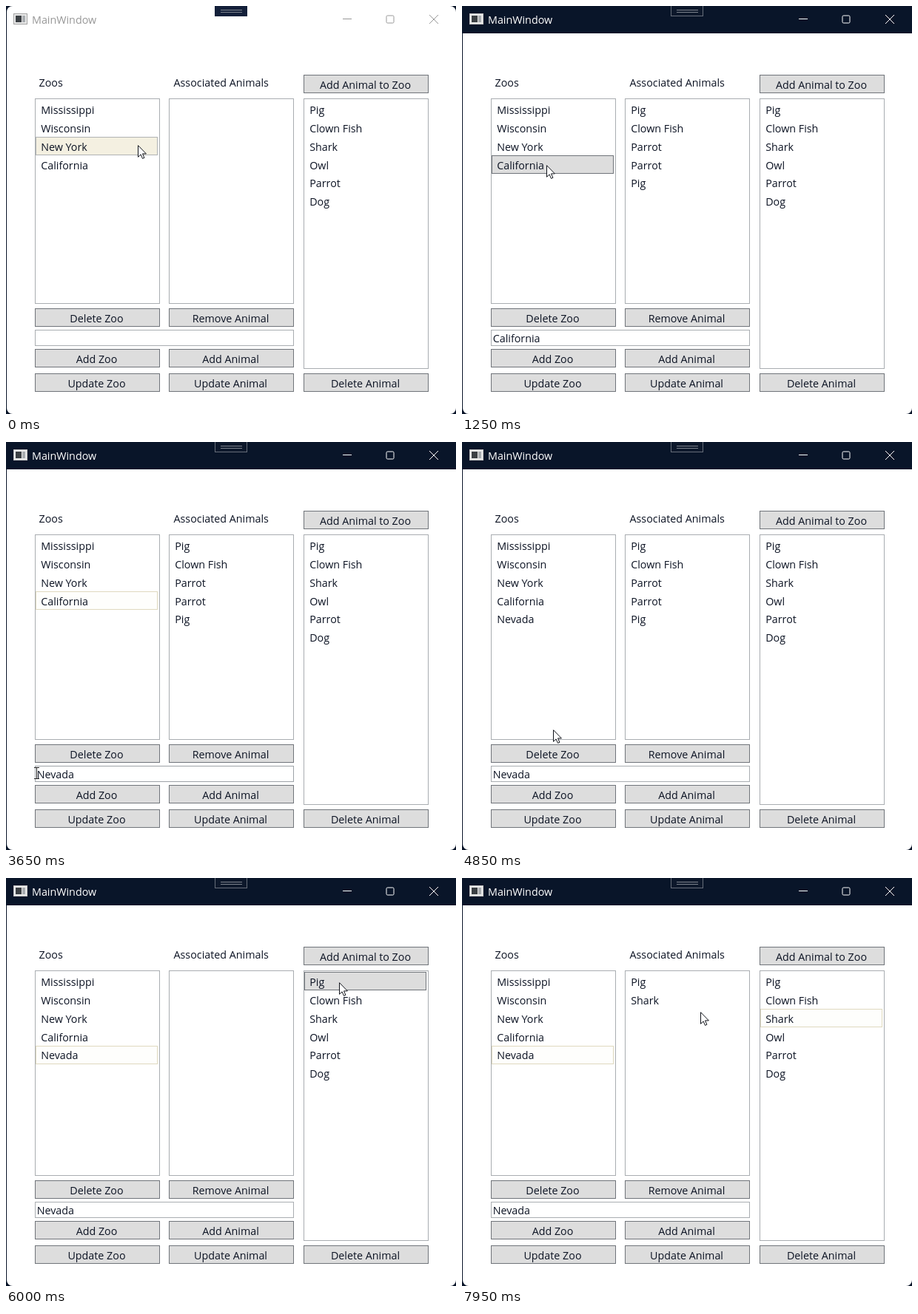
Recreate the animation shown at these times as an HTML page. Size 608 by 552 pixels, loop 8000 ms.

```html
<!DOCTYPE html>
<html lang="en">
<head>
<meta charset="utf-8">
<title>MainWindow</title>
<style>
  html, body { margin: 0; width: 608px; height: 552px; overflow: hidden; background: #fff; }
  svg { display: block; }
  text { font: 14.3px "Open Sans", "Noto Sans", sans-serif; fill: #0d1424; white-space: pre; }
</style>
</head>
<body>
<svg id="stage" width="608" height="552" viewBox="0 0 608 552"></svg>
<script>
const LOOP = 8000, STEP = 50;
const NAVY = '#091529', EDGE = '#70747a', FACE = '#dddddd', FRAME = '#a9adb1';
const stage = document.getElementById('stage');

// Layout: three columns of equal width, list rows and button rows.
const COLUMNS = [39, 220, 402], WIDTH = 169, ROW = 25, LIST_TOP = 125;
const BUTTON_ROWS = { top: 93, remove: 409, add: 464, update: 497 };
const BUTTONS = {
  top: ['', '', 'Add Animal to Zoo'],
  remove: ['Delete Zoo', 'Remove Animal', ''],
  add: ['Add Zoo', 'Add Animal', ''],
  update: ['Update Zoo', 'Update Animal', 'Delete Animal']
};
const STATES = ['Mississippi', 'Wisconsin', 'New York', 'California'];
const ANIMALS = ['Pig', 'Clown Fish', 'Shark', 'Owl', 'Parrot', 'Dog'];
const NEW_ZOO = 'Nevada';
const TYPING = { from: 2750, perLetter: 105 };

// Each event overrides part of the state from its time on.
const EVENTS = [
  [0, { active: false, zoos: STATES, owned: [], zoo: -1, animal: -1, focus: '', text: '' }],
  [350, { active: true, zoo: 0, focus: 'zoos', owned: ['Shark', 'Pig', 'Clown Fish'], text: 'Mississippi' }],
  [1100, { zoo: 3, owned: ['Pig', 'Clown Fish', 'Parrot', 'Parrot', 'Pig'], text: 'California' }],
  [1950, { focus: 'text' }],
  [4450, { focus: '' }],
  [4550, { zoos: [...STATES, NEW_ZOO], zoo: -1 }],
  [5150, { zoo: 4, focus: 'zoos', owned: [] }],
  [5950, { animal: 0, focus: 'animals' }],
  [6450, { focus: '', owned: ['Pig'] }],
  [6850, { animal: 2, focus: 'animals' }],
  [7450, { focus: '', owned: ['Pig', 'Shark'] }]
];

// Places the pointer visits, and its moves: start, end, destination.
const onItem = (column, row, dx = 75) => [COLUMNS[column] + dx, LIST_TOP + 15 + ROW * row];
const onButton = (column, row, dx) => [COLUMNS[column] + dx, BUTTON_ROWS[row] + 15];
const inText = x => [x, 448];
const HOME = [178, 188];
const MOVES = [
  [0, 400, onItem(0, 0)],
  [400, 550, [112, 111]],
  [650, 700, [117, 156]],
  [700, 1100, onItem(0, 3)],
  [1400, 1800, inText(117)],
  [1950, 2150, inText(41)],
  [3650, 3800, onButton(0, 'remove', 50)],
  [3800, 4000, inText(130)],
  [4150, 4200, onButton(0, 'add', 97)],
  [4800, 4850, [123, 389]],
  [4850, 5150, onItem(0, 4)],
  [5550, 5950, [450, 141]],
  [6050, 6350, onButton(2, 'top', 104)],
  [6550, 6850, onItem(2, 2, 82)],
  [6900, 7050, [488, 154]],
  [7050, 7200, onButton(2, 'top', 104)],
  [7700, 7950, [322, 181]]
];

const clamp = (v, lo, hi) => Math.min(hi, Math.max(lo, v));
const ease = u => u * u * (3 - 2 * u);

function pointerAt(t) {
  let [x, y] = HOME;
  for (const [start, end, goal] of MOVES) {
    const u = ease(clamp((t - start) / (end - start), 0, 1));
    x += (goal[0] - x) * u;
    y += (goal[1] - y) * u;
  }
  return { x: Math.round(x), y: Math.round(y) };
}

function stateAt(t) {
  const state = Object.assign({}, ...EVENTS.filter(e => e[0] <= t).map(e => e[1]));
  if (t >= TYPING.from) state.text = NEW_ZOO.slice(0, Math.floor((t - TYPING.from) / TYPING.perLetter));
  return state;
}

const inside = (p, x, y, w, h) => p && p.x >= x && p.x < x + w && p.y >= y && p.y < y + h;
const rect = (x, y, w, h, fill, stroke = 'none', rx = 0) =>
  `<rect x="${x}" y="${y}" width="${w}" height="${h}" fill="${fill}" stroke="${stroke}" rx="${rx}"/>`;
const box = (x, y, w, h, fill, stroke) => rect(x + .5, y + .5, w - 1, h - 1, fill, stroke);
const path = (d, stroke, fill = 'none', extra = '') =>
  `<path d="${d}" stroke="${stroke}" fill="${fill}" ${extra}/>`;
const label = (s, x, y, extra = '') => `<text x="${x}" y="${y}" ${extra}>${s}</text>`;

function titleBar(active) {
  const ink = active ? '#ffffff' : '#989898';
  return rect(0, 0, 608, 552, NAVY) + rect(1, 0, 607, 552, '#fff', 'none', 8) +
    (active ? rect(0, 0, 608, 37, NAVY) : '') +
    rect(282.5, -1.5, 43, 15, active ? '#0d182b' : '#14203a', active ? '#666d79' : '#14203a') +
    path('M290 5.5H319M290 8.5H319', '#7d838d') +
    box(10, 10, 19, 15, '#e9e9e9', active ? '#c4c4c4' : '#a2a2a2') +
    rect(13, 13, 8, 9, '#3c4044') + rect(22, 13, 4, 9, '#a9adb0') +
    label('MainWindow', 35, 24, `style="fill:${ink}"`) +
    path('M455 17.5H467', ink) +
    rect(514, 13, 10, 10, 'none', ink, 1.5) +
    path('M572 12L584 24M584 12L572 24', ink);
}

function button(name, x, y, p) {
  const hover = inside(p, x, y, WIDTH, ROW);
  return box(x, y, WIDTH, ROW, hover ? '#d6dade' : FACE, EDGE) +
    label(name, x + WIDTH / 2 - 1, y + 19, 'text-anchor="middle"');
}

const buttons = p => Object.entries(BUTTONS).map(([row, names]) =>
  names.map((name, i) => name && button(name, COLUMNS[i], BUTTON_ROWS[row], p)).join('')).join('');

function list(x, height, items, selected, focused, p) {
  const rows = items.map((item, i) => {
    const area = [x + 1, LIST_TOP + 2 + ROW * i, 165, ROW];
    let look = null;
    if (i === selected) look = focused ? [FACE, EDGE] : ['#fefefc', '#dfd9bf'];
    else if (inside(p, ...area)) look = ['#f4f0e1', '#b0b3b4'];
    return (look ? box(...area, ...look) : '') +
      label(item, x + 8.2, Math.floor(146.3 + 24.9 * i));
  });
  return box(x, LIST_TOP, WIDTH, height, '#fff', FRAME) + rows.join('');
}

function textBox(s, t, p) {
  const marked = t >= 1950 && t < TYPING.from;
  const left = clamp(p.x, 42, 104);
  return box(39, 438, 350, 22, '#fff', s.focus === 'text' ? '#9da2a7' : FRAME) +
    (marked ? rect(left, 440, 104.5 - left, 19, '#a9afb5') : '') +
    label(s.text, 41.7, 455);
}

function pointer(p) {
  const beam = inside(p, 39, 438, 350, 22);
  const place = `transform="translate(${p.x} ${p.y})"`;
  return beam
    ? path('M-3 -7.5h7M-3 7.5h7M.5 -7v14', '#222', 'none', place)
    : path('M.5 .7V16.3L4.1 12.9L6.5 18.4L8.9 17.3L6.5 11.9H11.4Z', '#10131a', '#fff', place);
}

function draw(t) {
  const s = stateAt(t), p = pointerAt(t);
  const visible = t < 2150 || t >= 3650 ? p : null;
  stage.innerHTML = titleBar(s.active) +
    label('Zoos', 44.5, 109) + label('Associated Animals', 226.5, 109) +
    list(COLUMNS[0], 278, s.zoos, s.zoo, s.focus === 'zoos', visible) +
    list(COLUMNS[1], 278, s.owned, -1, false, visible) +
    list(COLUMNS[2], 366, ANIMALS, s.animal, s.focus === 'animals', visible) +
    buttons(visible) + textBox(s, t, p) + (visible ? pointer(p) : '');
}

const start = performance.now();
let shown = -1;
function tick() {
  const t = Math.floor((performance.now() - start) % LOOP / STEP) * STEP;
  if (t !== shown) draw(shown = t);
  requestAnimationFrame(tick);
}
tick();
</script>
</body>
</html>
```
